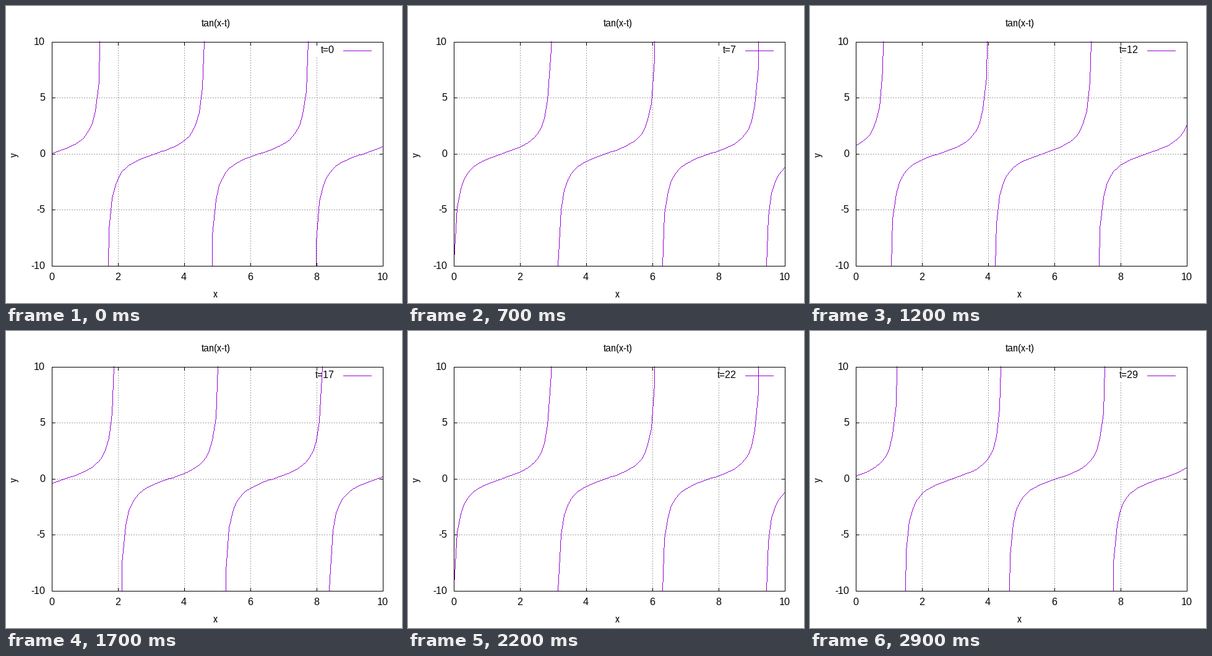
Animation of 640x480 px, one loop 3000 ms. Source, as a matplotlib script:

```python
import numpy as np
import matplotlib.pyplot as plt
from matplotlib.animation import FuncAnimation
from matplotlib.colors import to_rgba
from matplotlib.patches import Rectangle

W, H, DPI = 640, 480, 100
LEFT, RIGHT, TOP, BOTTOM = 74, 609, 57, 419
FRAMES, INTERVAL = 30, 100
PIXEL = 72 / DPI
PURPLE, GRID = "#9400d3", "#a0a0a0"
TIC = 5
KEY_LEFT, KEY_RIGHT, KEY_BOTTOM, KEY_Y = 545, 590, 80, 71

plt.rcParams.update({
    "font.family": "Liberation Sans",
    "font.size": 16 * PIXEL,
    "text.hinting": "native",
    "text.hinting_factor": 1,
    "axes.unicode_minus": False,
})

fig = plt.figure(figsize=(W / DPI, H / DPI), dpi=DPI, facecolor="white")
ax = fig.add_axes([0, 0, 1, 1])
# With these limits an integer point snaps to the pixel of that column and row.
ax.set_xlim(0, W)
ax.set_ylim(H - 1, -1)
ax.axis("off")


def col(x):
    """Pixel column of a value on the x axis."""
    return np.floor(LEFT + x * (RIGHT - LEFT) / 10 + 0.5)


def row(y):
    """Pixel row of a value on the y axis."""
    return np.ceil((TOP + BOTTOM) / 2 - y * (BOTTOM - TOP) / 20 - 0.5)


def rule(x0, y0, x1, y1, color="black", z=4, **style):
    """One-pixel straight line, both end pixels included."""
    ax.plot([x0, x1], [y0, y1], color=color, lw=PIXEL, snap=True, zorder=z,
            solid_capstyle="projecting", **style)


def label(x, y, text, ha="center"):
    return ax.text(x, y, text, ha=ha, va="baseline", zorder=2)


def draw_axes():
    # The half-pixel offset lines the dashes up with whole pixels.
    dots = dict(color=GRID, z=1, ls=(0.5, (2, 2)), dash_capstyle="butt")
    for x in range(0, 11, 2):
        c = col(x)
        if 0 < x < 10:
            rule(c, BOTTOM, c, KEY_BOTTOM if x == 8 else TOP, **dots)
        rule(c, BOTTOM, c, BOTTOM - TIC)
        rule(c, TOP, c, TOP + TIC)
        label(c - 0.5, 442, str(x))
    for y in range(-10, 11, 5):
        r = row(y)
        if abs(y) < 10:
            rule(LEFT, r, RIGHT, r, **dots)
        rule(LEFT, r, LEFT + TIC, r)
        rule(RIGHT, r, RIGHT - TIC, r)
        label(63, r + 5, str(y), ha="right")
    ax.add_patch(Rectangle((LEFT, TOP), RIGHT - LEFT, BOTTOM - TOP, fill=False,
                           ec="black", lw=PIXEL, snap=True, zorder=5))
    label(339, 32, "tan(x-t)")
    label(338.5, 470, "x")
    ax.text(13.5, 239, "y", rotation=90, ha="center", va="center")


def plot_line(pixels, c0, r0, c1, r1):
    """Set the pixels of a one-pixel line without smoothing."""
    n = int(max(abs(c1 - c0), abs(r1 - r0))) + 1
    cols = np.rint(np.linspace(c0, c1, n)).astype(int)
    rows = np.rint(np.linspace(r0, r1, n)).astype(int)
    pixels[rows, cols] = to_rgba(PURPLE)


draw_axes()
rule(KEY_LEFT, KEY_Y, KEY_RIGHT, KEY_Y, color=PURPLE, z=3)
key = label(531, 75, "", ha="right")
curve = ax.imshow(np.zeros((H, W, 4)), extent=(0, W, H - 1, -1), aspect="auto",
                  interpolation="nearest", zorder=3)
xs = np.linspace(0, 10, 100)


def update(t):
    pixels = np.zeros((H, W, 4))
    ys = np.tan(xs - 2 * np.pi * t / FRAMES)
    for x, y in zip(zip(xs, xs[1:]), zip(ys, ys[1:])):
        # Segments with both ends out of range are left out, others clipped.
        if min(np.abs(y)) > 10:
            continue
        yc = np.clip(y, -10, 10)
        xc = x[0] + (yc - y[0]) * (x[1] - x[0]) / (y[1] - y[0])
        c, r = col(xc), row(yc)
        plot_line(pixels, c[0], r[0], c[1], r[1])
    curve.set_data(pixels)
    key.set_text(f"t={t}")
    return curve, key


anim = FuncAnimation(fig, update, frames=FRAMES, interval=INTERVAL,
                     repeat=True, repeat_delay=0)
plt.show()
```
